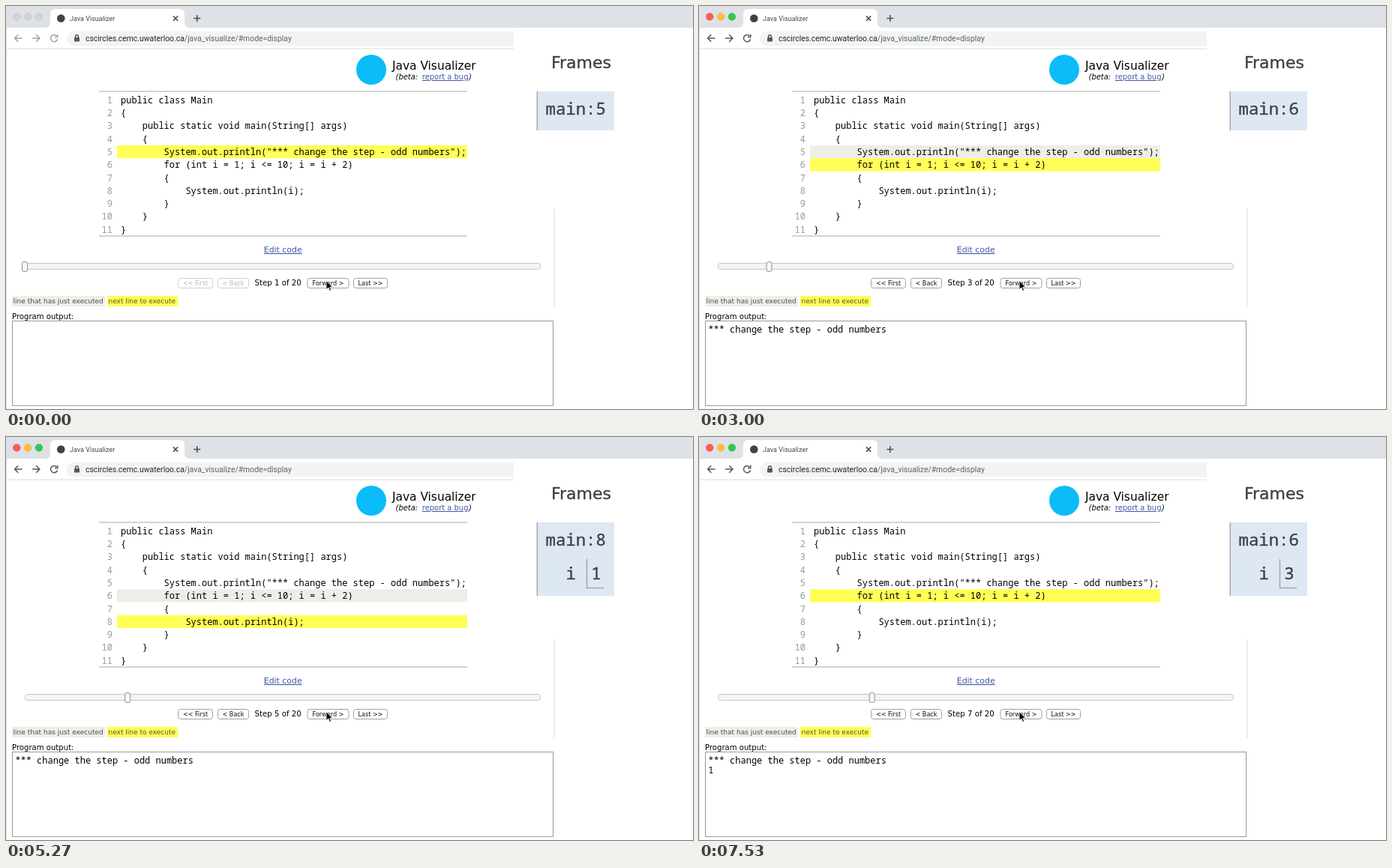
Animation of 916 by 538 pixels, one loop 8 s. Source, as an HTML page:

```html
<!DOCTYPE html>
<html lang="en">
<head>
<meta charset="utf-8">
<title>Java Visualizer</title>
<style>
html, body { margin: 0; width: 100%; height: 100%; overflow: hidden; background: #fff; }
svg { display: block; }
text { font-family: "DejaVu Sans", sans-serif; white-space: pre; }
.mono { font-family: "Noto Sans Mono", monospace; font-size: 12px; }
.ui { font-family: Roboto, sans-serif; }
.link { fill: #3d58a2; text-decoration: underline; }
.zoom { fill: #3c3f43; stroke: #3c3f43; stroke-width: .35px; filter: blur(.4px); }
.zoom.mono { font-size: 22.3px; }
.icon { fill: none; stroke-width: 1.5px; }
</style>
</head>
<body>
<svg id="stage" width="916" height="538" viewBox="0 0 916 538"></svg>
<script>
const LOOP = 8000;
const stepTimes = [0, 2070, 3000, 4330, 5270, 6470, 7530];
const pressTimes = [1930, 2870, 4130, 5070, 6270, 7330];
// [line just executed, next line, value of i]
const steps = [[0, 5], [0, 5], [5, 6], [0, 6, 1], [6, 8, 1], [8, 6, 1], [0, 6, 3]];
const code = `public class Main
{
    public static void main(String[] args)
    {
        System.out.println("*** change the step - odd numbers");
        for (int i = 1; i <= 10; i = i + 2)
        {
            System.out.println(i);
        }
    }
}`.split("\n");
const LINE = 17.27;

const esc = s => String(s).replace(/&/g, "&amp;").replace(/</g, "&lt;");
const rect = (x, y, w, h, fill, more = "") =>
  `<rect x="${x}" y="${y}" width="${w}" height="${h}" fill="${fill}" ${more}/>`;
const circle = (x, y, r, fill, more = "") =>
  `<circle cx="${x}" cy="${y}" r="${r}" fill="${fill}" ${more}/>`;
const path = (d, more = "") => `<path d="${d}" ${more}/>`;
const text = (x, y, s, more = "") => `<text x="${x}" y="${y}" ${more}>${esc(s)}</text>`;
const size = (px, fill = "#000") => `font-size="${px}" fill="${fill}"`;
const mono = (x, y, s, more = "") => text(x, y, s, `class="mono" ${more}`);

// focus: 0 = window in the background, 1 = active window
function windowButtons(focus) {
  const lights = ["#fc5b57", "#fdbc40", "#34c84a"].map((color, k) => {
    const x = 14.3 + 14.8 * k;
    return circle(x, 14.3, 4.7, "#d2d4d7", 'stroke="#bfc1c4" stroke-width=".8"') +
      circle(x, 14.3, 5.1, color, `opacity="${focus}"`);
  }).join("");
  const shade = Math.round(160 - 75 * focus);
  return lights + `<g class="icon" stroke="rgb(${shade},${shade + 2},${shade + 5})">` +
    path("M21.5 43H12M16.3 38.3L11.6 43L16.3 47.7M35 43H44.5M40.2 38.3L44.9 43L40.2 47.7") +
    path("M67.6 40A4.6 4.6 0 1 0 68.6 44.2M68.8 37.8V41.6H65") + "</g>";
}

function browser(focus) {
  return rect(0, 0, 916, 29, "#dee1e6") +
    path("M52 29Q59 29 59 22V11Q59 4 66 4H231Q238 4 238 11V22Q238 29 245 29Z", 'fill="#fff"') +
    windowButtons(focus) +
    circle(73.3, 16.5, 5.3, "#3f4347") +
    text(85, 19.6, "Java Visualizer", `class="ui" ${size(9, "#44474b")}`) +
    path("M223 13.4L229.2 19.6M229.2 13.4L223 19.6M250.3 16.5H259.3M254.8 12V21",
      'class="icon" stroke="#4a4d51"') +
    rect(81, 33.5, 640, 20, "#f1f3f4", 'rx="10"') +
    rect(91, 42, 7, 5.4, "#54575b", 'rx=".8"') +
    path("M92.6 42V40.6A1.9 1.9 0 0 1 96.4 40.6V42", 'class="icon" stroke="#54575b"') +
    `<text x="106" y="46.7" class="ui" ${size(10.4, "#222427")}>cscircles.cemc.uwaterloo.ca` +
    '<tspan fill="#5f6368">/java_visualize/#mode=display</tspan></text>' +
    rect(0, 56.5, 916, 1, "#dcdee0") + rect(0, 29, 1, 509, "#dcdee0") +
    rect(677, 33, 239, 237, "#fff");
}

function listing(done, next) {
  const bar = (n, color) => n ? rect(148, 186 + LINE * (n - 5), 467, LINE, color) : "";
  const rows = code.map((s, k) => {
    const y = 129.9 + LINE * k;
    return mono(142, y, k + 1, 'text-anchor="end" fill="#999"') + mono(153, y, s);
  }).join("");
  return rect(124, 113.5, 491, 1, "#aaa") + rect(124, 306.5, 491, 1, "#aaa") +
    bar(done, "#eeeee8") + bar(next, "#ffff57") + rows;
}

function button(x, w, label, state = "") {
  const [fill, line, ink] = {
    off: ["#fff", "#d2d2d2", "#b8b8b8"],
    down: ["#226df0", "#1b50bd", "#10204c"]
  }[state] || ["#fff", "#a0a0a0", "#111"];
  return rect(x + .5, 363.5, w - 1, 13, fill, `rx="3" stroke="${line}"`) +
    text(x + w / 2, 373, label, `text-anchor="middle" ${size(8.1, ink)}`);
}

function controls(n, pressed) {
  const back = n === 1 ? "off" : "";
  return text(343.8, 329, "Edit code", `class="link" font-size="10.9"`) +
    rect(25.5, 343.5, 687, 8, "#f4f4f4", 'rx="3" stroke="#c8c8c8"') +
    rect(21.5 + 34.28 * (n - 1), 341.5, 7, 13, "#f7f7f7", 'rx="2.5" stroke="#909090"') +
    button(229, 47, "<< First", back) + button(282, 42, "< Back", back) +
    text(331.6, 373.3, `Step ${n} of 20`, size(10.2)) +
    button(401.5, 56, "Forward >", pressed ? "down" : "") + button(463, 46, "Last >>");
}

function frames(next, i) {
  let s = text(727, 83, "Frames", 'class="zoom" font-size="22"') +
    rect(708, 114, 103, i ? 98 : 52, "#dee8f5") +
    rect(707.5, 114, 1.5, i ? 98 : 52, "#a3a9b1") +
    mono(719.5, 145, "main:" + next).replace("mono", "mono zoom");
  if (i) {
    s += path("M774.5 163V201.5H797", 'fill="none" stroke="#a3aba9" stroke-width="1.6"') +
      mono(746.5, 190, "i").replace("mono", "mono zoom") +
      mono(780.3, 190, i).replace("mono", "mono zoom");
  }
  return s;
}

function output(n) {
  return rect(8, 387, 124, 14, "#eeeee8") + rect(135, 387, 94, 14, "#ffff57") +
    text(9.5, 397, "line that has just executed", size(9.05, "#4c4c4c")) +
    text(136.5, 397, "next line to execute", size(9, "#55552c")) +
    rect(730.5, 270, 1, 132, "#dcdcdc") +
    text(8, 418, "Program output:", size(10.1)) +
    rect(8.5, 420.5, 721, 113, "#fff", 'stroke="#999"') +
    (n > 2 ? mono(12.3, 435.7, "*** change the step - odd numbers") : "") +
    (n > 5 ? mono(12.3, 449.2, "1") : "");
}

function header() {
  return circle(487, 85, 20, "#0bbcf8") +
    text(515, 85, "Java Visualizer", size(15.4)) +
    text(519.5, 98, "(beta: ", `font-style="italic" ${size(9.95)}`) +
    text(554.8, 98, "report a bug", 'class="link" font-size="9.95"') +
    text(617, 98, ")", `font-style="italic" ${size(9.95)}`);
}

const pointer = path("M427 366.5V378.6L429.8 376L431.6 380.4L433.6 379.5L431.8 375.3H435.5Z",
  'fill="#000" stroke="#fff" stroke-width=".9"');

function draw(focus, n, pressed) {
  const [done, next, i] = steps[n - 1];
  return browser(focus) + header() + listing(done, next) + controls(n, pressed) +
    frames(next, i) + output(n) + pointer;
}

const stage = document.getElementById("stage");
const count = (times, t) => times.filter(x => x <= t).length;
let shown = "";

function tick() {
  const t = performance.now() % LOOP;
  const focus = count([1000, 1070], t) / 2;
  const n = count(stepTimes, t);
  const pressed = count(pressTimes, t) >= n;
  const key = [focus, n, pressed].join();
  if (key !== shown) {
    shown = key;
    stage.innerHTML = draw(focus, n, pressed);
  }
  requestAnimationFrame(tick);
}
tick();
</script>
</body>
</html>
```
